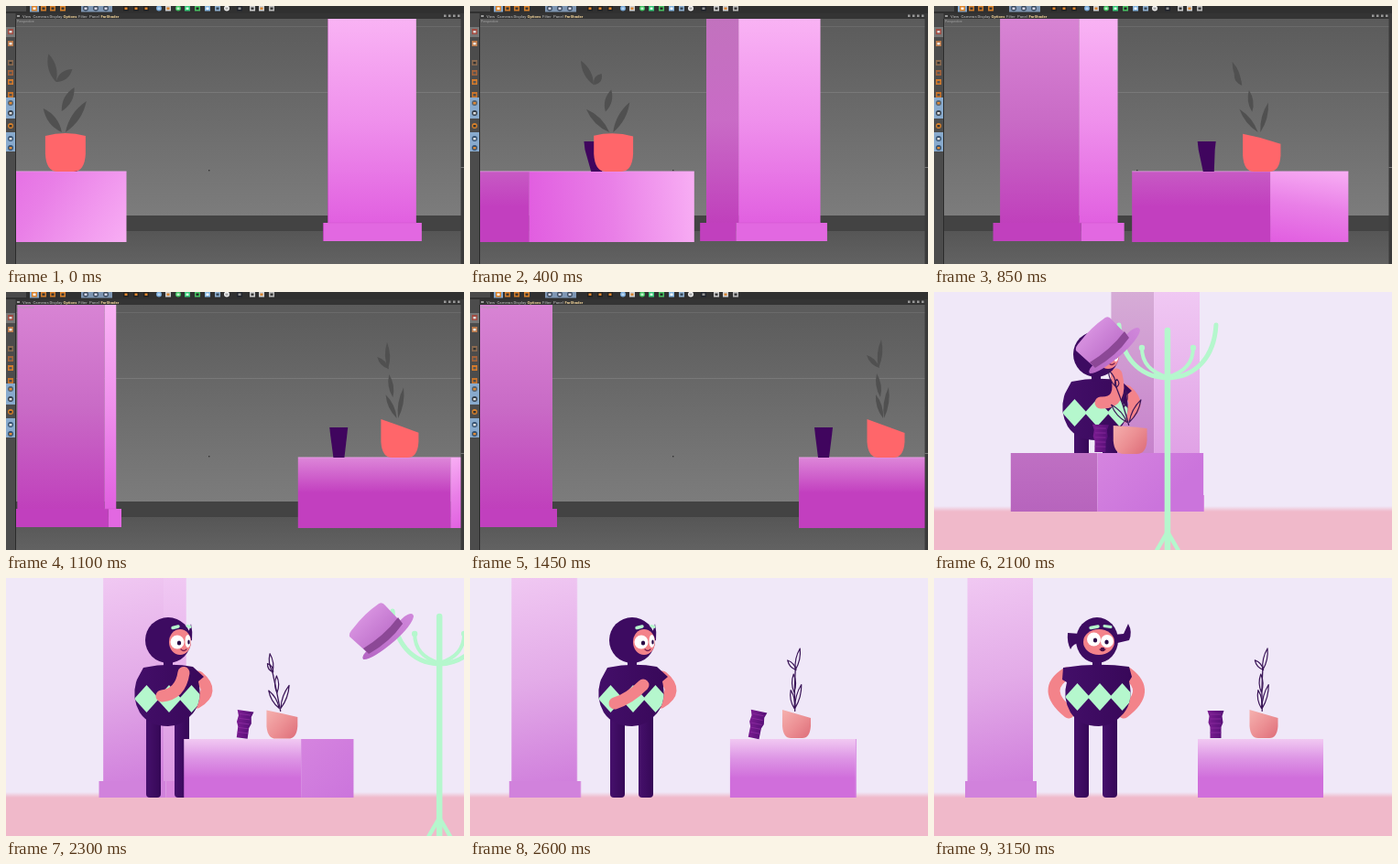
An HTML page with a canvas that plays this animation: 500 px wide and 282 px high, repeating every 3200 ms.

```html
<!DOCTYPE html>
<html lang="en">
<head>
<meta charset="utf-8">
<title>Turntable scene</title>
<style>
html, body { margin: 0; width: 100%; height: 100%; overflow: hidden; background: #555; }
canvas, svg { position: absolute; left: 0; top: 0; width: 100%; height: 100%; display: block; }
text { font: 4.3px Roboto, Arial, sans-serif; fill: #c4c4c4; }
.hot { fill: #f2d49a; font-weight: 700; }
.dim { fill: #a6a6a6; font-size: 3.6px; }
</style>
</head>
<body>
<canvas id="stage" width="500" height="282"></canvas>
<svg id="menu" viewBox="0 0 500 282" preserveAspectRatio="none">
  <text x="18" y="12.6">View</text>
  <text x="29.5" y="12.6">Cameras</text>
  <text x="47.5" y="12.6">Display</text>
  <text x="62.5" y="12.6" class="hot">Options</text>
  <text x="79" y="12.6">Filter</text>
  <text x="91" y="12.6">Panel</text>
  <text x="103.5" y="12.6" class="hot">FarShader</text>
  <text x="12" y="18" class="dim">Perspective</text>
</svg>
<script>
const LOOP = 3200, STEP = 50, CUT = 1500;
const c = document.getElementById('stage').getContext('2d');
const menu = document.getElementById('menu');

const { sin, cos, PI } = Math;
const clamp = v => Math.max(0, Math.min(1, v));
const mix = (a, b, k) => a + (b - a) * k;
const ease = v => (1 - cos(PI * clamp(v))) / 2;
const turn = (axis, a, b, ang) => axis + a * cos(ang) + b * sin(ang);
const blend = (p, q, k) => p.map((v, i) => mix(v, q[i], k));

function grad(x0, y0, x1, y1, ...cols) {
  const g = c.createLinearGradient(x0, y0, x1, y1);
  cols.forEach((col, i) => g.addColorStop(i / (cols.length - 1), col));
  return g;
}
function rect(x, y, w, h, fill) {
  if (w <= 0) return;
  c.fillStyle = fill;
  c.fillRect(x, y, w, h);
}
function shape(d, fill) {
  c.fillStyle = fill;
  c.fill(new Path2D(d));
}
function line(d, col, w) {
  c.strokeStyle = col;
  c.lineWidth = w;
  c.lineCap = 'round';
  c.lineJoin = 'round';
  c.stroke(new Path2D(d));
}
function oval(x, y, rx, ry, fill) {
  c.fillStyle = fill;
  c.beginPath();
  c.ellipse(x, y, rx, ry, 0, 0, 2 * PI);
  c.fill();
}

// Two visible sides of a turning block that meet at x.
function block(x, y, w, d, h, ang, dark, light) {
  const dw = d * sin(ang), lw = w * cos(ang);
  rect(x - dw, y, dw, h, dark(x - dw, dw));
  rect(x, y, lw, h, light(x, lw));
}

// base a, base b, base y, tip a, tip b, tip y; a and b are front and side offsets
const LEAVES = [
  [-9, -7, 83, -17, -4, 52],
  [-9, -6, 83, 9, -20, 69],
  [-3, -5, 115, 11, -9, 89],
  [-3, -2, 138, -23, -10, 112],
  [1, -1, 138, 24, 4, 104]
];

function plant(x, bottom, k, ang, lean, outlined) {
  const sway = sin(2 * ang);
  const at = (a, b, y) => {
    const r = Math.max(0, 138 - y) / 85;
    return [x + k * (turn(0, a, b, ang) - 25 * sway * r ** 1.3) + lean * r,
            bottom - k * (181 - y - 11 * sway * r * r)];
  };
  const wide = k * mix(6.5, 4, sin(ang));
  if (outlined) {
    const [p, q, r] = [at(0, -1, 142), at(-3, -5, 115), at(-9, -7, 83)];
    line(`M${p}Q${q} ${r}`, '#3b1658', 1.3);
  }
  for (const [a, b, y, ta, tb, ty] of LEAVES) {
    const p = at(a, b, y), q = at(ta, tb, ty);
    const dx = q[0] - p[0], dy = q[1] - p[1], len = Math.hypot(dx, dy);
    const nx = -dy / len * wide * 1.3, ny = dx / len * wide * 1.3;
    const mx = (p[0] + q[0]) / 2, my = (p[1] + q[1]) / 2;
    const d = `M${p}Q${[mx + nx, my + ny]} ${q}Q${[mx - nx, my - ny]} ${p}Z`;
    outlined ? line(d, '#3b1658', 1.2) : shape(d, '#505050');
  }
}

function pot(x, w, left, right, bottom, fill, dome) {
  const l = x - w / 2, r = x + w / 2, m = (left + right) / 2;
  shape(`M${l} ${left}Q${x} ${m - dome} ${r} ${right}V${mix(m, bottom, .5)}
    Q${r - 1} ${bottom} ${x + w * .2} ${bottom}H${x - w * .2}
    Q${l + 1} ${bottom} ${l} ${mix(m, bottom, .5)}Z`, fill);
}

// ---- editor view ----

function icon(x, y, col, alt, round) {
  if (round) oval(x, y, 3, 3, col);
  else rect(x - 3, y - 3, 6, 6, col);
  rect(x - 1.5, y - 1, 3, 2.4, alt);
}

function editorFrame() {
  rect(0, 0, 500, 8, '#303030');
  rect(0, 0, 22, 6, '#4a4a4a');
  rect(0, 8, 500, 6, '#343434');
  rect(0, 8, 10.5, 274, '#4c4c4c');
  rect(10, 14, 1, 268, '#2b2b2b');
  rect(496.5, 8, 3.5, 274, '#3a3a3a');
  rect(496.5, 176, 3.5, 1, '#777');
  rect(26, 0, 10, 6.5, '#86a9cf');
  rect(82, 0, 34, 6.5, '#7f97b4');
  const top = [
    [31, '#d9822b', '#fff'], [41, '#d07c2c', '#333'], [51, '#cf7a28', '#333'], [62, '#d9822b', '#333'],
    [87, '#39495c', '#dde', 1], [98, '#39495c', '#dde', 1], [109, '#39495c', '#dde', 1],
    [131, '#222', '#e88a2c'], [142, '#222', '#e88a2c'], [153, '#222', '#e88a2c'],
    [167, '#78a9d8', '#b9d8f2', 1], [177, '#d0d0d0', '#d9822b'], [188, '#43c463', '#c6f3cf', 1],
    [198, '#38c878', '#e2ffe9'], [209, '#48c062', '#222'], [220, '#86b6e0', '#fff'],
    [231, '#8fb0d0', '#345'], [241, '#f1f1f1', '#aaa', 1], [255, '#20242c', '#999'],
    [269, '#ccc', '#333'], [279, '#d2d2d2', '#d9822b'], [290, '#bbb', '#333']
  ];
  for (const [x, col, alt, round] of top) icon(x, 2.5, col, alt, round);
  rect(0, 100, 10, 23, '#88aacd');
  rect(0, 138, 10, 21, '#88aacd');
  rect(0, 23, 10, 11, '#777');
  const side = [
    [28, '#a04c42', '#ddd'], [41, '#bb7a4b', '#eee'], [62, '#8a6a50', '#333'], [73, '#a3623a', '#555'],
    [83, '#d27a2c', '#555'], [97, '#c8742c', '#4c4c4c'], [106, '#55606c', '#e08a35'],
    [117, '#313b47', '#ddd'], [131, '#d9822b', '#333'], [145, '#34506e', '#ddd'], [155, '#34506e', '#e08a35']
  ];
  for (const [y, col, alt] of side) icon(5, y, col, alt, y > 100);
  for (let i = 0; i < 4; i++) rect(478 + i * 5, 9.5, 2.5, 2.5, '#999');
  rect(12, 10, 3, 2, '#999');
}

function editor(t) {
  const ang = ease((t + 67) / 1437) * PI / 2;
  const s = sin(ang), go = (a, b) => turn(230, a, b, ang);

  rect(0, 0, 500, 282, '#555');
  rect(11, 14, 486, 215, grad(0, 14, 0, 229, '#5b5b5b', '#7c7c7c'));
  rect(11, 94, 486, .6, '#858585');
  rect(11, 22, 486, .6, '#747474');
  rect(11, 229, 486, 17, '#434343');
  rect(11, 246, 486, 36, grad(0, 246, 0, 282, '#565656', '#626262'));
  rect(221, 179, 1.4, 1.4, '#333');

  const darkTop = s > .8 ? '#d884d4' : '#c272be';
  const px = go(123, -140);
  block(px, 14, 96, 96, 223, ang,
    () => grad(0, 14, 0, 237, darkTop, '#c96bc6', '#c040bc'),
    () => grad(0, 14, 0, 237, '#f9b3f4', '#ef90ec', '#e160e0'));
  block(go(118, -135), 237, 107, 107, 20, ang, () => '#c140be', () => '#e268e1');
  rect(px, 236.6, 96 * cos(ang), .7, '#d458d2');

  const tx = go(-295, 297);
  block(tx, 181, 194, 168, 77, ang,
    () => grad(0, 181, 0, 258, s > .95 ? '#dd86d9' : '#c75ac4', '#c23fbf', '#c23fbf'),
    (x, w) => {
      const dir = .6 - ang * 1.8, r = Math.abs(cos(dir)) * w / 2 + Math.abs(sin(dir)) * 38;
      const mx = x + w / 2, dx = cos(dir) * r, dy = sin(dir) * r;
      return grad(mx - dx, 219.5 - dy, mx + dx, 219.5 + dy, '#e15de0', '#e97fe7', '#f8aef4');
    });
  rect(tx - 168 * s, 180.5, 168 * s + 194 * cos(ang), .7, '#f0a4ee');

  const vx = go(-160, 156), tilt = -6 * sin(2 * ang) * cos(ang);
  shape(`M${vx - 10 + tilt} 148H${vx + 10 + tilt}L${vx + 9 + tilt} 157L${vx + 6} 181H${vx - 6}L${vx - 9 + tilt} 157Z`, '#40055e');
  const x = go(-167, 224);
  plant(x - 1, 181, 1, ang, 0, false);
  const slant = s ** 3;
  pot(x, mix(44, 41, s), mix(142, 139, slant), mix(142, 154, slant), 181, '#ff666a', mix(6, 0, slant));

  editorFrame();
}

// ---- rendered view ----

const PURPLE = '#3d0b61', PINK = '#f3838a', MINT = '#b5f7cd';

function arm(p) {
  line(`M${p[0]} ${p[1]}Q${p[2]} ${p[3]} ${p[4]} ${p[5]}`, PINK, 13);
}

function person(t) {
  const front = ease((t - 2620) / 330);
  const fold = ease((t - 2100) / 400);
  const near = blend(blend([182, 121, 207, 122, 199, 90], [158, 137, 174, 132, 189, 117], fold),
    [145, 104, 116, 122, 147, 147], front);
  const far = blend([210, 108, 229, 124, 208, 136], [211, 104, 238, 124, 207, 147], front);

  for (const x of [153, 184]) {
    c.fillStyle = grad(x, 0, x + 16, 0, '#46106c', '#360857');
    c.beginPath();
    c.roundRect(x, 145, 16, 95, 4);
    c.fill();
  }
  arm(far);
  if (front > .5) arm(near);

  const mid = mix(177, 180, front), l = mix(150, 141, front), cuff = mix(143, 140, front);
  const body = new Path2D(`M${l} 98Q178 92 ${mix(204, 213, front)} 97L216 108L${mid + 33} 113
    Q${mid + 38} 134 ${mid + 27} 148Q${mid + 15} 162 ${mid} 162Q${mid - 21} 162 ${mid - 31} 147
    Q${mid - 40} 131 ${mid - 35} 114L${cuff} 111Z`);
  c.save();
  c.fillStyle = grad(140, 0, 216, 0, '#430e69', '#380859');
  c.fill(body);
  c.clip(body);
  const cy = mix(132, 130, front);
  for (const i of [-1, 0, 1]) {
    const m = mid + 1 + i * 24.5;
    shape(`M${m - 13.5} ${cy}L${m} ${cy - 15}L${m + 13.5} ${cy}L${m} ${cy + 15}Z`, MINT);
  }
  c.restore();
  if (front <= .5) arm(near);

  const hx = mix(177, 178, front);
  rect(hx - 5, 86, 10, 12, PURPLE);
  shape(`M${hx + 18} 62L${mix(200, 207, front)} ${mix(57, 61, front)}L${mix(202, 212, front)} 50
    Q${mix(204, 217, front)} 59 ${mix(203, 213, front)} 68L${hx + 18} 72Z`, PURPLE);
  if (front > .1) shape(`M${hx - 18} 61L${mix(160, 146, front)} 60Q${mix(160, 145, front)} 70
    ${mix(160, 149, front)} 78Q${mix(160, 152, front)} 71 ${hx - 18} 71Z`, PURPLE);
  oval(hx, 68, mix(25, 23, front), 25, PURPLE);

  const fx = mix(190, 180, front);
  oval(fx, 70, mix(12, 17, front), 14, PINK);
  oval(fx - mix(3, 5.5, front), mix(70, 67, front), 7.5, 7.5, '#fff');
  oval(fx + mix(8.5, 9, front), 69, mix(3, 7, front), 7, '#fff');
  oval(fx - mix(1, 4, front), mix(71, 68, front), 2.2, 2.6, '#2a0845');
  oval(fx + mix(9.5, 8.5, front), 70, mix(1.2, 2.2, front), 2.6, '#2a0845');
  line(`M${fx + 1} 78Q${fx + 4} 81 ${fx + 7} 78`, '#7a2050', 1.2);
  if (front > .5) oval(fx + 4, 78, 2.5, 2.2, '#4a1048');
  line(`M${fx - mix(8, 9, front)} 54.5L${fx - mix(2, 1, front)} 53`, MINT, 3.4);
  line(`M${fx + mix(8, 6, front)} 52.5L${fx + mix(11, 13, front)} 53.5`, MINT, 3);
}

function vase(x, tilt) {
  c.save();
  c.translate(x, 175);
  c.rotate(tilt);
  shape('M-9 -30H9L7 -24L8 -17L6 -12L6 0H-6V-12L-8 -17L-7 -24Z', grad(-8, 0, 8, 0, '#7a1c90', '#581078'));
  for (let y = -26; y < -2; y += 5) line(`M-5.5 ${y}H5.5`, '#8c2ca0', .8);
  c.restore();
}

function rack(x, ang) {
  const k = cos((ang - .76) * .6);
  for (const side of [-1, 1]) {
    const at = d => x + side * d * k;
    line(`M${at(53)} 36C${at(51)} 70 ${at(32)} 93 ${x} 94`, MINT, 5);
    line(`M${at(28)} 61C${at(28)} 78 ${at(18)} 88 ${x} 93`, MINT, 4);
    oval(at(28), 61, 3.2, 3.2, MINT);
    line(`M${x} 262L${x + side * 15} 288`, MINT, 4.5);
  }
  line(`M${x} 42V290`, MINT, 6.5);

  c.save();
  c.translate(x - 252 + 53 * (1 - k), 0);
  shape('M167 89Q164 85 174 77L212 42Q221 36 222 42Q220 52 201 69Q176 90 167 89Z', grad(168, 88, 220, 42, '#b566c4', '#cf86da'));
  shape('M152 64Q151 60 156 55Q168 39 184 28Q188 26 191 30L210 50Q196 70 173 83Z', grad(160, 38, 194, 72, '#dc98e4', '#bb6cc8'));
  shape('M167 77Q190 63 205 43L210 50Q196 70 173 83Z', '#8c4896');
  c.restore();
}

function rendered(t) {
  const ang = ease((t - 1580) / 1060) * PI / 2;
  const s = sin(ang), go = (a, b) => turn(183, a, b, ang);
  const drift = 8 * (1 - ease((t - 2600) / 500)) * s ** 4;
  const late = s > .9;

  rect(0, 0, 500, 282, '#f0e8f8');
  rect(0, 234, 500, 6, grad(0, 234, 0, 240, '#f0e8f8', '#f0b9ca'));
  rect(0, 240, 500, 42, '#f0b9ca');

  const px = go(148, -75) + drift;
  block(px, 0, 69, mix(64, 71.5, s * s), 222, ang,
    x => late ? grad(x, 0, x + 50, 226, '#f0c8f2', '#e3abe8', '#d07fdc')
              : grad(0, 0, 0, 222, '#d6acd6', '#c377c9'),
    () => grad(0, 0, 0, 222, '#f0c8f3', '#dc98e2'));
  block(px + 4 * s - 4 * cos(ang), 222, 76, 78, 18, ang,
    () => late ? '#d182dc' : '#bd6cc6', () => '#d888de');

  person(t);

  const tx = go(-236.5, 242) - drift * .35;
  block(tx, 176, 160, 137, 64, ang,
    () => late ? grad(0, 176, 0, 240, '#f1c9f2', '#dd95e5', '#d06edb', '#d06edb')
               : grad(0, 176, 0, 240, '#bf70c3', '#b764bd'),
    x => grad(x, 176, x + 60, 240, '#d584df', '#cb74dc'));

  const lean = .2 * (ease((t - 2000) / 500) - ease((t - 2600) / 250));
  vase(go(-122, 124.5) + drift * .35, lean);
  const x = go(-125, 177) - drift * .35, w = 31 + 8 * cos(ang), slant = s ** 3;
  plant(x - 1, 175, .76, ang, 8, true);
  pot(x, w, mix(147, 144, slant), mix(147, 153, slant), mix(178, 175, slant),
    grad(x - w / 2, 145, x + w / 2, 176, '#f5b0ae', '#ec9094', '#dd6c78'), mix(1, 0, slant));

  rack(go(-311, 430), ang);
}

const start = performance.now();
function draw() {
  const t = Math.floor((performance.now() - start) % LOOP / STEP) * STEP;
  const inEditor = t < CUT;
  menu.style.display = inEditor ? 'block' : 'none';
  inEditor ? editor(t) : rendered(t);
  requestAnimationFrame(draw);
}
draw();
</script>
</body>
</html>
```
